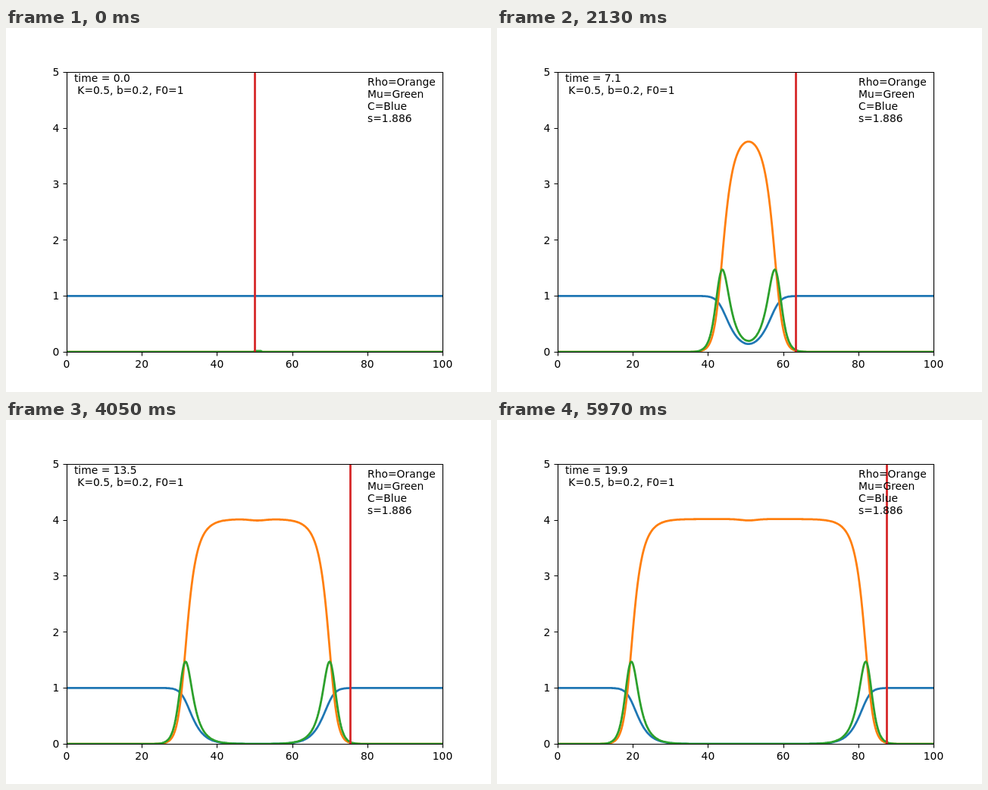
An HTML page for the animation above (6 s loop, 640 px wide and 480 px high).

```html
<!DOCTYPE html>
<html lang="en">
<head>
<meta charset="utf-8">
<title>Travelling wave plot</title>
<style>
  html, body { margin: 0; width: 100%; height: 100%; overflow: hidden; background: #fff; }
  svg { display: block; }
  text { font: 13.89px "DejaVu Sans", sans-serif; fill: #000; white-space: pre; }
  .curve { fill: none; stroke-width: 2.78; stroke-linejoin: round; }
  .axis { fill: none; stroke: #000; stroke-width: 1.11; }
</style>
</head>
<body>
<svg id="plot" width="640" height="480" viewBox="0 0 640 480">
  <clipPath id="area"><rect x="80" y="58" width="496" height="370"/></clipPath>
</svg>
<script>
const STEP_MS = 30, STEPS = 200;
const LINE_SPEED = 1.886, CENTER = 50.8;
const svg = document.getElementById("plot");

const px = x => 80 + 4.96 * x;
const py = y => 427.2 - 73.92 * y;
const snap = v => Math.round(v) + 0.5;

function add(tag, attrs, parent = svg, content = "") {
  const el = document.createElementNS("http://www.w3.org/2000/svg", tag);
  for (const key in attrs) el.setAttribute(key, attrs[key]);
  el.textContent = content;
  return parent.appendChild(el);
}
const label = (x, y, content, anchor = "start") =>
  add("text", { x, y, "text-anchor": anchor }, svg, content);

const curves = add("g", { "clip-path": "url(#area)" });
const curve = stroke => add("path", { class: "curve", stroke }, curves);
const cPath = curve("#1f77b4");
const rhoPath = curve("#ff7f0e");
const muPath = curve("#2ca02c");
const frontLine = curve("#d62728");

let axes = "M80.5 58.5H576.5V427.5H80.5Z";
for (let x = 0; x <= 100; x += 20) {
  axes += `M${snap(px(x))} 427.5v5`;
  label(px(x), 448, x, "middle");
}
for (let y = 0; y <= 5; y++) {
  axes += `M80.5 ${snap(py(y))}h-5`;
  label(70.3, Math.round(py(y) + 5.2), y, "end");
}
add("path", { class: "axis", d: axes });

const timeText = label(89.9, 71, "");
label(89.9, 87, "\u00a0K=0.5, b=0.2, F0=1");
["Rho=Orange", "Mu=Green", "C=Blue", "s=1.886"].forEach((s, i) => label(477, 76 + 16 * i, s));

// Local growth: d(rho)/dt = mu(rho), dc/dt = -0.2 rho c.
const growth = r => r * (4 - r) * (0.445 - 0.0253 * r - 0.009 * r * r);
const DT = 0.01;
const history = [];
let peakIndex = 0;
for (let i = 0, rho = 1e-4, eaten = 0; i < 2400; i++) {
  history.push([rho, eaten]);
  if (rho < 1.68) peakIndex = i;
  const mid = rho + growth(rho) * DT / 2;
  rho += growth(mid) * DT;
  eaten += mid * DT;
}

// State at a point whose mu peak passed `tau` ago.
function state(tau) {
  const pos = Math.min(tau / DT + peakIndex, history.length - 2);
  if (pos < 0) return [0, 0];
  const i = Math.floor(pos), f = pos - i;
  return history[i].map((v, k) => v + f * (history[i + 1][k] - v));
}

const arrival = r => 4.34 + (Math.hypot(r, 2.2) - 2.2) / 1.87;

function draw(step) {
  const t = step / 10;
  const c = [], rhos = [], mus = [];
  const seed = 0.015 * Math.exp(-t / 0.3);
  for (let x = 0; x <= 100; x += 0.25) {
    const r = Math.abs(x - CENTER);
    const [rho, eaten] = state(t - arrival(r));
    const dip = 1.003 - 0.006 * Math.exp(-((r / 3) ** 2));
    const at = y => px(x).toFixed(2) + " " + py(y).toFixed(2);
    c.push(at(Math.exp(-0.2 * eaten)));
    rhos.push(at(rho * dip));
    mus.push(at(growth(rho) + (r < 1 ? seed : 0)));
  }
  const trace = (path, points) => path.setAttribute("d", "M" + points.join("L"));
  trace(cPath, c);
  trace(rhoPath, rhos);
  trace(muPath, mus);
  frontLine.setAttribute("d", `M${snap(px(50 + LINE_SPEED * t))} 50V430`);
  timeText.textContent = "time = " + t.toFixed(1);
}

let shown = -1;
const start = performance.now();
function tick() {
  const step = Math.floor((performance.now() - start) / STEP_MS) % STEPS;
  if (step !== shown) draw(shown = step);
  requestAnimationFrame(tick);
}
tick();
</script>
</body>
</html>
```
